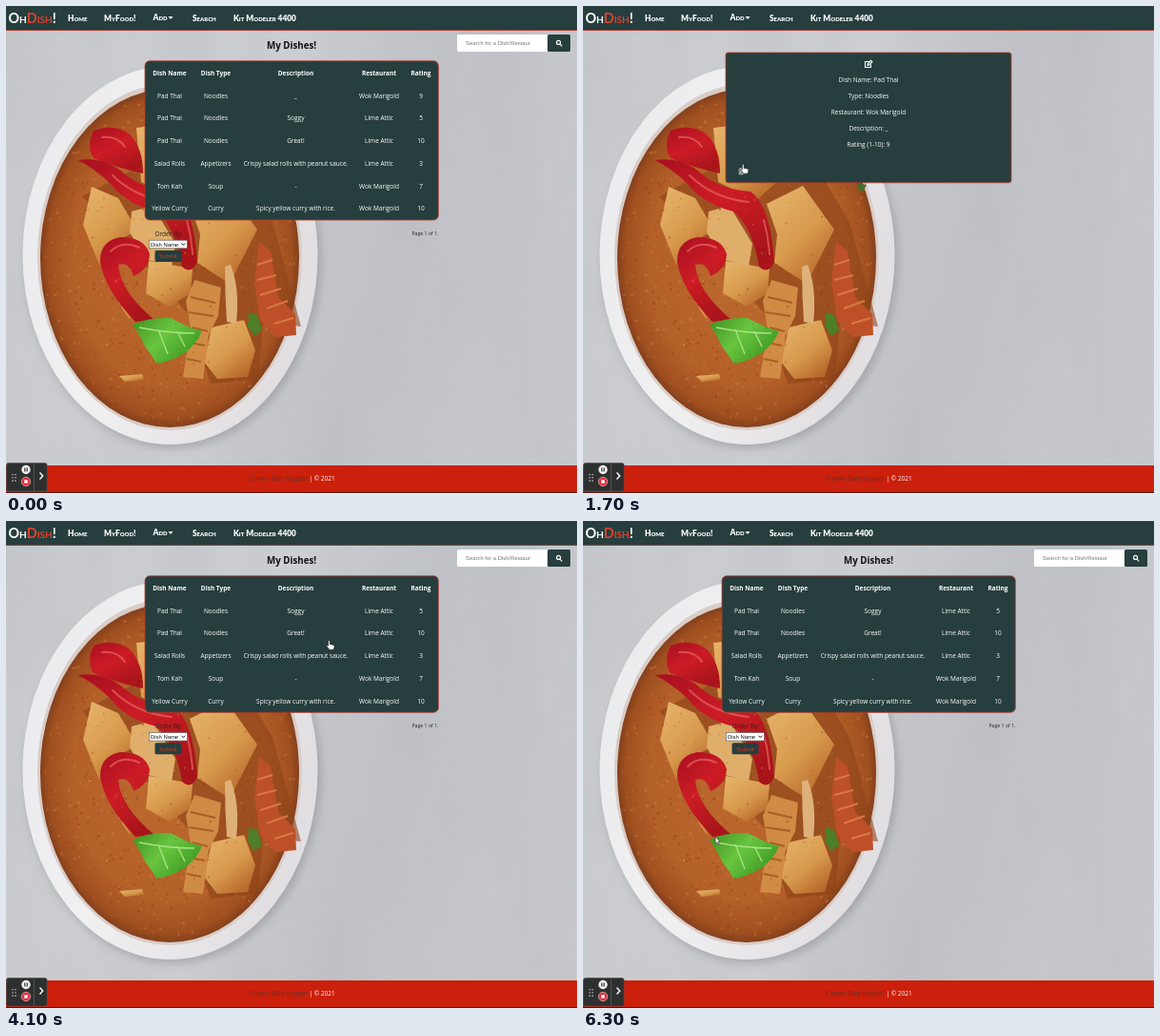
Recreate the animation shown at these times as an HTML page. Size 600 px wide and 512 px high, loop 6400 ms.

```html
<!DOCTYPE html>
<html lang="en">
<head>
<meta charset="utf-8">
<title>Dish list</title>
<style>
  html, body { margin: 0; width: 100%; height: 100%; overflow: hidden; background: #c6c8cc; }
  svg { display: block; width: 600px; height: 512px; }
  text { font: 6.5px "Open Sans", sans-serif; fill: #fff; white-space: pre; }
  .mid { text-anchor: middle; }
  .bold { font-weight: 700; }
  .title { font-size: 9.75px; font-weight: 700; }
  .nav { font: 900 8.3px Lato, sans-serif; font-variant: small-caps; }
  .logo { font: 700 14.3px Lato, sans-serif; font-variant: small-caps; }
  .ui { font: 5.9px "Liberation Sans", Arial, sans-serif; }
  .button { font-size: 6px; font-weight: 700; }
  .panel { fill: #263e3d; stroke: #b5352a; stroke-width: .8; }
</style>
</head>
<body>
<svg viewBox="0 0 600 512">
  <defs>
    <linearGradient id="wall" x2="1" y2=".25">
      <stop stop-color="#c8cacd"/><stop offset=".5" stop-color="#cdced2"/>
      <stop offset=".75" stop-color="#c0c2c7"/><stop offset="1" stop-color="#c6c8cc"/>
    </linearGradient>
    <radialGradient id="curry">
      <stop stop-color="#bd6a2e"/><stop offset=".75" stop-color="#b46029"/>
      <stop offset=".94" stop-color="#a04f1f"/><stop offset="1" stop-color="#84401c"/>
    </radialGradient>
    <linearGradient id="rim" x2="1" y2=".4">
      <stop stop-color="#e9eaee"/><stop offset=".5" stop-color="#f1f0f1"/><stop offset="1" stop-color="#e2dfe2"/>
    </linearGradient>
    <linearGradient id="tofu" x2=".7" y2="1">
      <stop stop-color="#e6b66d"/><stop offset=".6" stop-color="#d89a4d"/><stop offset="1" stop-color="#b8692b"/>
    </linearGradient>
    <linearGradient id="pepper" x2=".6" y2="1">
      <stop stop-color="#a80f20"/><stop offset=".5" stop-color="#cc1c25"/><stop offset="1" stop-color="#a9141a"/>
    </linearGradient>
    <linearGradient id="leaf" x2="1" y2=".6">
      <stop stop-color="#3f8f22"/><stop offset=".5" stop-color="#69c53f"/><stop offset="1" stop-color="#3c9a23"/>
    </linearGradient>
    <filter id="marble" x="0" y="0" width="1" height="1">
      <feTurbulence type="fractalNoise" baseFrequency=".018 .006" numOctaves="3" seed="4"/>
      <feColorMatrix values="0 0 0 0 .45  0 0 0 0 .46  0 0 0 0 .49  .9 0 0 0 -.3"/>
    </filter>
    <filter id="soft"><feGaussianBlur stdDeviation=".6"/></filter>
    <filter id="shade" x="-20%" y="-20%" width="140%" height="140%"><feGaussianBlur stdDeviation="5"/></filter>
  </defs>

  <rect width="600" height="512" fill="url(#wall)"/>
  <rect width="600" height="512" filter="url(#marble)" opacity=".5"/>

  <g id="bowl">
    <ellipse cx="176" cy="267" rx="155" ry="198" fill="#85878c" opacity=".5" filter="url(#shade)"/>
    <ellipse cx="172.5" cy="262" rx="155" ry="199" fill="url(#rim)"/>
    <ellipse cx="172" cy="264" rx="139" ry="182" fill="#d9cdc8"/>
    <ellipse cx="172" cy="265" rx="136" ry="178" fill="url(#curry)"/>
    <g id="specks"></g>
    <g filter="url(#soft)">
      <g fill="#8d431a" opacity=".6">
        <path d="M80 200l55 60 55 62 25 75 50-5 5-60 40 5-30-110-60-100z"/>
      </g>
      <g fill="url(#tofu)">
        <path d="M137 128l50-6 25 55-30 28-40-20z"/>
        <path d="M90 190l28 12 20 34-34 18-6 18-17-42z"/>
        <path d="M193 208l38-19 33 46-29 57-34-22 3-30z"/>
        <path d="M150 268l46 8-2 26-22 14-25-14z"/>
        <path d="M216 338l34-8 12 32-8 28-32 2-14-18z"/>
        <path d="M118 311l13-4 7 20-7 5z"/>
        <path d="M119 389l24-2 2 6-20 2z"/>
      </g>
      <path d="M132 216l22-6 24 40-4 24-28-8-16-28z" fill="#dfae6b"/>
      <path d="M236 272q10 24 6 62l-10-2q-2-30-2-58z" fill="#ddb179"/>
      <path d="M266 248l12 10 8 48 18 18 1 22-22 2-16-18-6-40z" fill="#bd5028"/>
      <path d="M198 288l28 8-3 30-10 20-6 46-21-2 8-50-5-30z" fill="#d08b44"/>
      <g fill="none" stroke="#d97743" stroke-width="2">
        <path d="M264 272l16-5M264 288l20-5M267 304l22-7M274 318l22-8M282 334l20-6"/>
      </g>
      <g fill="none" stroke="#a95f27" stroke-width="2">
        <path d="M194 306l26 6M192 322l26 4M196 338l16 4M193 354l16 3M190 371l15 3"/>
      </g>
      <path d="M92 131q22-8 38 4 14 14 14 41-28-6-52-16-8-12 0-29z" fill="url(#pepper)"/>
      <path d="M76 162q27-4 48 14 20 17 52 19 21 15 25 74-6 14-16 5-7-42-27-58-32-8-48-29-14-14-34-25z" fill="url(#pepper)"/>
      <path d="M99 268q0-21 21-25 26 0 31 18-1 16-17 23-4-16-16-12 2 28 38 58l-20 2q-33-34-37-64z" fill="url(#pepper)"/>
      <g fill="none" stroke="#ea6660" stroke-width="2" stroke-linecap="round" opacity=".7">
        <path d="M101 138q16-2 24 10M112 178q24 24 62 28M110 258q12-12 30-4M190 225q5 18 6 36"/>
      </g>
      <path d="M133 335q16-8 40-7 18 10 33 14-6 14-20 24-14 8-28 10-4-8-12-18-4-10-13-23z" fill="url(#leaf)"/>
      <path d="M140 338q30 6 58 6M160 340l10 26M180 342l8 16" fill="none" stroke="#a5e283" stroke-width="1.4"/>
      <path d="M255 322l9 3 5 16-8 6-7-10z" fill="#4c7f27"/>
      <path d="M288 186l10 2-4 8-5-3z" fill="#4e6a2c"/>
    </g>
    <g id="spice"></g>
  </g>

  <rect width="600" height="25.5" fill="#263e3d"/>
  <rect y="25" width="600" height=".9" fill="#b5352a"/>
  <text class="logo" x="2.5" y="18">Oh<tspan fill="#e0412f">Dish</tspan>!</text>
  <g id="nav"></g>
  <path d="M170.500 11h5l-2.500 3z" fill="#fff"/>

  <rect y="483" width="600" height="29" fill="#cb200b"/>
  <rect y="511" width="600" height="1" fill="#5a120b"/>
  <text x="317" y="499.300" text-anchor="end" fill="#263e3d" style="fill:#643029">Corwin Dale Hupper</text>
  <text x="318.500" y="499.300">| © 2021</text>

  <g id="recorder">
    <rect x=".5" y="480.500" width="42.500" height="29.500" rx="2" fill="#2e3030" stroke="#4a4b4b" stroke-width=".6"/>
    <path d="M7 492v8M10 492v8" stroke="#c9c9c9" stroke-width="1.3" stroke-dasharray="1.300 2"/>
    <circle cx="21" cy="487.500" r="4.700" fill="#f1f1f1"/>
    <path d="M19.800 485.500v4M22.200 485.500v4" stroke="#333" stroke-width="1.200"/>
    <circle cx="21" cy="500" r="4.700" fill="#e0303c" stroke="#f3d5d5" stroke-width=".6"/>
    <rect x="19.300" y="498.300" width="3.400" height="3.400" fill="#fff"/>
    <path d="M29.500 481v29" stroke="#606161" stroke-width=".7"/>
    <path d="M35.500 490.500l3.200 3.500-3.200 3.500" fill="none" stroke="#fff" stroke-width="1.400"/>
  </g>

  <g id="page"></g>

  <g id="cursor" stroke="#222" stroke-width=".6" stroke-linejoin="round">
    <path id="hand" fill="#fff" d="M0 0q1.200-.5 1.300 1v3l4 .9q.9.300.8 1.600l-.9 3.300H.9L-2 6.200q-.5-1.200.9-1l.7.600V.8z"/>
    <path id="arrow" fill="#fff" d="M0 0v7.200l1.700-1.600 1.200 2.700 1.200-.6-1.200-2.600h2.300z"/>
  </g>
</svg>

<script>
const LOOP = 6400, STEP = 100;
const $ = id => document.getElementById(id);
const text = (x, y, label, cls = 'mid', fill = '') =>
  `<text x="${x}" y="${y + 2.3}" class="${cls}"${fill && ` style="fill:${fill}"`}>${label}</text>`;
const box = (x, y, w, h, attrs) => `<rect x="${x}" y="${y}" width="${w}" height="${h}" ${attrs}/>`;

// Background detail
let seed = 7;
const random = () => (seed = seed * 16807 % 2147483647) / 2147483647;
function scatter(id, count, colours, maxSize, spread) {
  let dots = '';
  for (let i = 0; i < count; i++) {
    const angle = random() * 2 * Math.PI, radius = Math.sqrt(random()) * spread;
    const x = 172 + 133 * radius * Math.cos(angle), y = 265 + 174 * radius * Math.sin(angle);
    const colour = colours[Math.floor(random() * colours.length)];
    dots += `<circle cx="${x.toFixed(1)}" cy="${y.toFixed(1)}" r="${(.4 + random() * maxSize).toFixed(1)}" fill="${colour}"/>`;
  }
  $(id).innerHTML = dots;
  $(id).setAttribute('opacity', .45);
}
scatter('specks', 900, ['#8d4218', '#cf8442', '#a63b17', '#c97836'], 1.3, 1);
scatter('spice', 160, ['#8f3c16', '#b5471c', '#e0a45e'], .8, .75);

$('nav').innerHTML = [[65, 'Home', 0], [103, 'MyFood!', 0], [154.5, 'Add', -.6], [196, 'Search', 0], [239, 'Kit Modeler 4400', 0]]
  .map(([x, label, dy]) => text(x, 13.2 + dy, label, 'nav')).join('');

// Pages
const columns = [172, 220.5, 304.5, 392, 436];
const header = ['Dish Name', 'Dish Type', 'Description', 'Restaurant', 'Rating'];
const dishes = [
  ['Pad Thai', 'Noodles', '_', 'Wok Marigold', 9],
  ['Pad Thai', 'Noodles', 'Soggy', 'Lime Attic', 5],
  ['Pad Thai', 'Noodles', 'Great!', 'Lime Attic', 10],
  ['Salad Rolls', 'Appetizers', 'Crispy salad rolls with peanut sauce.', 'Lime Attic', 3],
  ['Tom Kah', 'Soup', '-', 'Wok Marigold', 7],
  ['Yellow Curry', 'Curry', 'Spicy yellow curry with rice.', 'Wok Marigold', 10]
];

function listPage(rows) {
  const bottom = 82.5 + rows.length * 23.75;
  const cells = (row, y, cls) => row.map((cell, i) => text(columns[i], y, cell, cls)).join('');
  return text(300, 42.3, 'My Dishes!', 'mid title', '#111') +
    box(474, 30, 96, 18, 'rx="1.5" fill="#fff"') +
    text(483, 39, 'Search for a Dish/Restaur', 'ui', '#777') +
    box(569, 30, 24, 18, 'rx="1.5" fill="#263e3d"') +
    '<path d="M582.300 40.300l2 2M582.600 38.400a2 2 0 1 0-4 0a2 2 0 1 0 4 0" fill="none" stroke="#fff" stroke-width="1.200"/>' +
    box(146, 57.8, 308.3, bottom - 57.8, 'rx="5" class="panel"') +
    cells(header, 70.6, 'mid bold') +
    rows.map((row, i) => cells(row, 94.3 + i * 23.75, 'mid')).join('') +
    text(156.5, bottom + 14.5, 'Order By:', '', '#2b2320') +
    box(150.3, bottom + 21.2, 40, 8.6, 'fill="#fff" stroke="#555" stroke-width=".6"') +
    text(152, bottom + 25.3, 'Dish Name', 'ui', '#111') +
    `<path d="M184.500 ${bottom + 24.5}l1.800 1.800 1.800-1.800" fill="none" stroke="#111" stroke-width="1"/>` +
    box(156.5, bottom + 32, 28, 12, 'rx="1.5" fill="#263e3d"') +
    text(170.5, bottom + 38, 'Submit', 'mid ui', '#cf3a22') +
    `<g style="font-size:5.2px"><text x="454.500" y="${bottom + 16}" text-anchor="end" style="font-size:5.200px;fill:#222">Page 1 of 1.</text></g>`;
}

const card = box(150, 49, 300, 136.8, 'rx="2.5" class="panel"');

const detailPage = card +
  '<path d="M300.500 58.500h-4v6h6v-3M299 62.300l.4-1.700 3.200-3.200 1.300 1.300-3.200 3.200z" fill="none" stroke="#fff" stroke-width="1.100"/>' +
  ['Dish Name: Pad Thai', 'Type: Noodles', 'Restaurant: Wok Marigold', 'Description: _', 'Rating (1-10): 9']
    .map((line, i) => text(300, 77.8 + i * 16.9, line)).join('') +
  '<path d="M163.500 171.800h5.400M165.200 171.500v-.8h2v.8M164.200 172.500v4.300h4v-4.300M165.600 173.300v2.500M166.900 173.300v2.500" fill="none" stroke="#fff" stroke-width=".7"/>';

const confirmPage = card +
  text(300, 66, 'Confirm Delete', 'mid title') +
  text(300, 86, 'Are you sure you would like to delete "Pad Thai " from the database?') +
  box(248, 116, 38.5, 17.5, 'rx="2" fill="#4db94d"') +
  text(267.2, 124.7, 'Cancel', 'mid button', '#f3f7e8') +
  box(292.8, 115.7, 65.4, 17.3, 'rx="2" fill="#4db94d" stroke="#263e3d" stroke-width=".7" stroke-dasharray="2 1"') +
  text(325.5, 124.6, 'Yes, delete item.', 'mid button', '#f3f7e8');

const scenes = [
  [0, listPage(dishes)],
  [1100, detailPage],
  [2000, confirmPage],
  [3700, listPage(dishes.slice(1))]
];

// Pointer stops: time, x, y
const stops = [
  [0, 606, 300], [200, 606, 300], [900, 178, 96.5], [1200, 178, 96.5], [1800, 167, 172],
  [2000, 167, 172], [2300, 170.5, 177.5], [2700, 170.5, 177.5], [3300, 339, 125.5],
  [5700, 339, 125.5], [6300, 139, 332], [LOOP, 139, 332]
];

function pointerAt(t) {
  const i = stops.findIndex(stop => stop[0] > t);
  const [t0, x0, y0] = stops[i - 1], [t1, x1, y1] = stops[i];
  const p = (t - t0) / (t1 - t0), k = p * p * (3 - 2 * p);
  return [x0 + (x1 - x0) * k, y0 + (y1 - y0) * k];
}

let shown;
function draw(now) {
  const t = Math.floor(now % LOOP / STEP) * STEP;
  const scene = scenes.findLast(([start]) => start <= t);
  if (scene !== shown) {
    shown = scene;
    $('page').innerHTML = scene[1];
  }
  const [x, y] = pointerAt(t);
  const overPanel = x > 146 && x < 454 && y > 50 && y < 201;
  $('cursor').setAttribute('transform', `translate(${x} ${y})`);
  $('hand').style.display = overPanel ? '' : 'none';
  $('arrow').style.display = overPanel ? 'none' : '';
  requestAnimationFrame(draw);
}
draw(performance.now());
</script>
</body>
</html>
```
